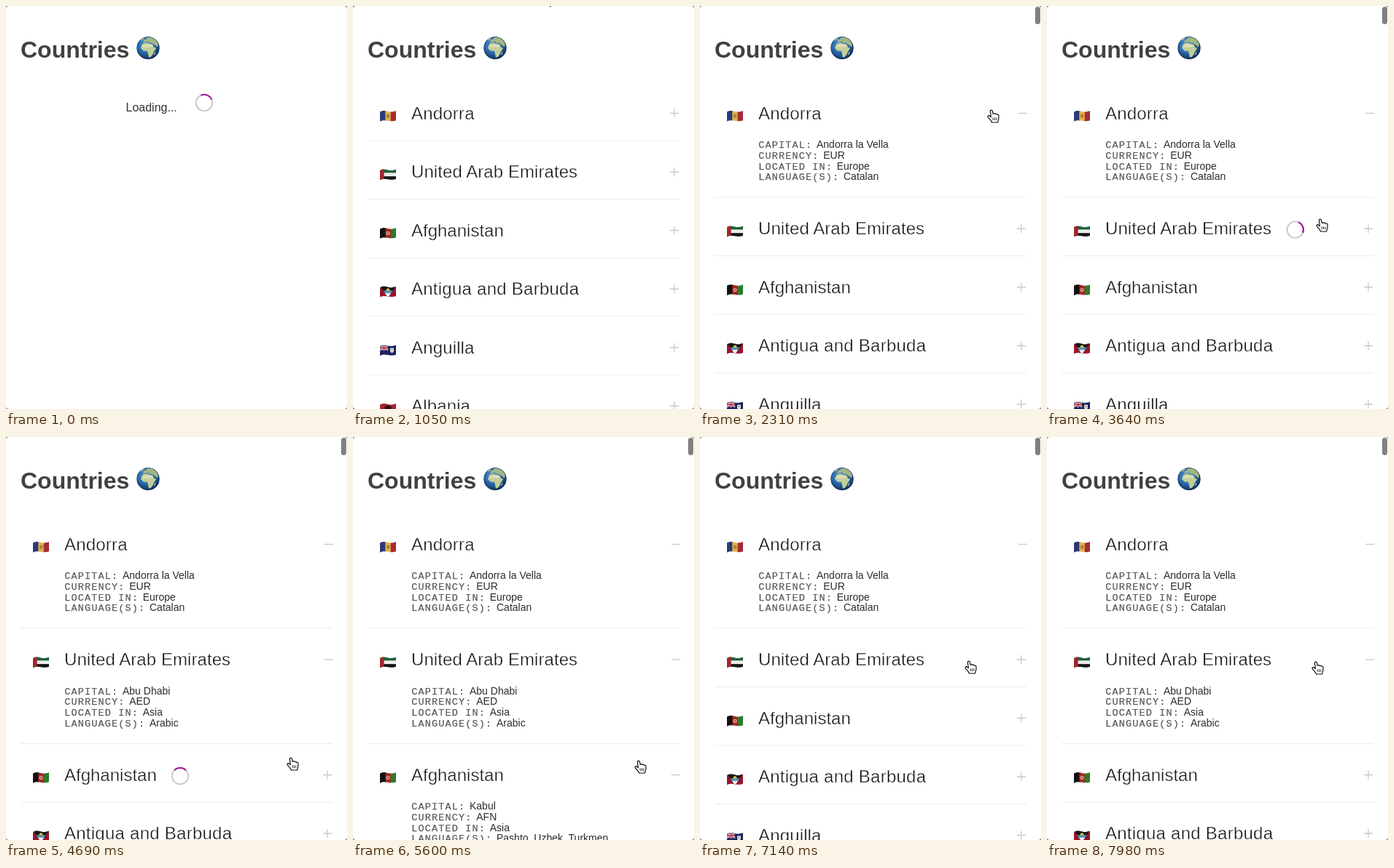
An HTML page that plays this animation: 468x554 px, repeating every 8000 ms.

```html
<!DOCTYPE html>
<html lang="en">
<head>
<meta charset="utf-8">
<title>Countries</title>
<style>
  html, body { margin: 0; width: 100%; height: 100%; overflow: hidden; background: #fff; }
  svg { display: block; width: 468px; height: 554px; }
  text { font-family: "Liberation Sans", Arial, Helvetica, sans-serif; fill: #333; white-space: pre; }
  .title { font-size: 32px; font-weight: 700; fill: #414141; }
  .loading { font-size: 16px; }
  /* the white outline thins the letters to a light weight */
  .name { font-size: 24px; fill: #141414; stroke: #fff; stroke-width: .45px; }
  .key { font: 13.5px "Liberation Mono", "Courier New", monospace; letter-spacing: 1.15px; fill: #5c5c5c; stroke: #5c5c5c; stroke-width: .25px; }
  .value { font-size: 14px; fill: #2b2b2b; }
  .rule { stroke: #ececec; }
  .sign { stroke: #c8c8c8; stroke-width: 1.3; }
</style>
</head>
<body>
<svg viewBox="0 0 468 554" xmlns="http://www.w3.org/2000/svg">
  <defs>
    <radialGradient id="sea" cx=".42" cy=".36" r=".66">
      <stop offset="0" stop-color="#5c9fd6"/>
      <stop offset=".55" stop-color="#2a68a8"/>
      <stop offset="1" stop-color="#0f2c54"/>
    </radialGradient>
    <clipPath id="disc"><circle r="15.8"/></clipPath>
    <clipPath id="wave">
      <path d="M0 2.2C4 .2 7 .4 11 1.6S18 2.4 22 .8V14C18 15.6 15 15 11 14.4S4 13.4 0 15.4Z"/>
    </clipPath>
  </defs>
  <path fill="#777" d="M0 0H468V554H0Z"/>
  <rect width="468" height="554" rx="4" fill="#fff"/>

  <text class="title" x="20" y="71">Countries</text>
  <g transform="translate(195 57.7)" clip-path="url(#disc)">
    <circle r="15.8" fill="url(#sea)"/>
    <g fill="#c3cf9a">
      <path d="M-8-5C-5-8-1-7 1-6L6-5 8-1 11 0C10 3 7 5 7 8L4 12 1 13 0 8-1 4-6 4-10 0Z"/>
      <path d="M-7-8-6-11-3-12-1-15 5-15 11-11 14-6 13-1 11-3 8-5 5-7 2-7 0-9-4-8Z" fill="#a3b580"/>
      <path d="M9 6 10 5 10 8 8 10Z"/>
      <path d="M-11-10-8-14-5-14-8-11Z" fill="#d6e2c4"/>
    </g>
    <path d="M-8-3C-4-6 3-5 6-4L7-2C2-1-4-1-8-1Z" fill="#e0ddb4"/>
    <circle r="15.3" fill="none" stroke="#0d2c58" stroke-opacity=".5"/>
  </g>

  <text class="loading" id="loading" x="164.5" y="145">Loading...</text>
  <g id="list"></g>
  <g id="spinner" fill="none" stroke-width="2">
    <circle r="11.2" stroke="#ccc"/>
    <path d="M-7.92-7.92A11.2 11.2 0 0 1 7.92-7.92" stroke="#a3129c"/>
  </g>
  <rect id="thumb" x="460" y="1" width="7" height="24" rx="3.5" fill="#808080"/>

  <g id="cursor" stroke-linejoin="round">
    <g id="hand" transform="translate(-1 0)" stroke="#111" stroke-width="1.2">
      <path fill="#fff" d="M-1.6 1.6C-1.6-.3.9-.3 1.3 1.2L2.3 5.3C3 4.2 4.9 4.3 5.2 5.6 6 4.8 7.5 5.1 7.8 6.4 8.6 5.8 10 6.3 10 7.7V11C10 13.2 8.8 14 8.6 17H.6C0 14.6-3 12.2-4.8 9.6-5.6 8-3.5 7-2.2 8.2L-.6 9.6Z"/>
      <path fill="none" stroke-width=".9" d="M2.2 10.3V14M4.5 10.3V14M6.8 10.3V14"/>
    </g>
    <path id="arrow" fill="#111" stroke="#fff" d="M0 0V14.2L3.3 11.2 5.5 16.3 7.9 15.3 5.7 10.3H10Z"/>
  </g>
</svg>
<script>
const NS = "http://www.w3.org/2000/svg";
const LOOP = 8000, LOADED = 800, SCROLLBAR = 1960;
const FIRST_Y = 147.5, ROW = 80.5, DETAIL = 78;
const $ = id => document.getElementById(id);

function add(parent, tag, attrs, content) {
  const node = document.createElementNS(NS, tag);
  for (const k in attrs) node.setAttribute(k, attrs[k]);
  if (content) node.textContent = content;
  return parent.appendChild(node);
}

const band = (x, y, w, h, fill) => ["rect", { x, y, width: w, height: h, fill }];
const shape = (d, fill) => ["path", { d, fill }];
const line = (d, stroke, w) => ["path", { d, stroke, "stroke-width": w }];
const dot = (cx, cy, r, fill) => ["circle", { cx, cy, r, fill }];

// open: time spans during which the details are shown
const countries = [
  { name: "Andorra", gap: .2, open: [[1960, LOOP]],
    info: ["Andorra la Vella", "EUR", "Europe", "Catalan"],
    flag: [band(0, 0, 8, 16, "#2c3a78"), band(7.3, 0, 7.7, 16, "#dfb647"), band(14.7, 0, 8, 16, "#a82a36"),
      band(9, 5.5, 4.2, 5, "#b08045")] },
  { name: "United Arab Emirates", gap: .07, open: [[4130, 6930], [7490, LOOP]],
    info: ["Abu Dhabi", "AED", "Asia", "Arabic"],
    flag: [band(0, 0, 22, 6, "#1f6138"), band(0, 5.6, 22, 5, "#ededed"), band(0, 10.3, 22, 6, "#161616"),
      band(0, 0, 5.6, 16, "#a1262c")] },
  { name: "Afghanistan", gap: 0, open: [[5040, 5950]],
    info: ["Kabul", "AFN", "Asia", "Pashto, Uzbek, Turkmen"],
    flag: [band(0, 0, 8, 16, "#111"), band(7.3, 0, 7.7, 16, "#a82420"), band(14.7, 0, 8, 16, "#2f7a2c"),
      dot(11, 8, 2.6, "#d9a698"), dot(11, 8, 1.3, "#b0443c")] },
  { name: "Antigua and Barbuda", gap: .25, open: [],
    flag: [band(0, 0, 22, 16, "#98162b"), shape("M0 0H22L11 16Z", "#161616"), shape("M4.5 6.5H17.5L11 16Z", "#4a96bf"),
      shape("M6.8 10H15.2L11 16Z", "#f4f4f4"), shape("M8 6.6 9 4.4 11 3.2 13 4.4 14 6.6Z", "#dcc04a")] },
  { name: "Anguilla", gap: .15, open: [],
    flag: [band(0, 0, 22, 16, "#1c2560"), line("M0 1 11 8M11 1 0 8", "#eee", 1.8), line("M0 1 11 8M11 1 0 8", "#b0203a", .7),
      line("M5.5 0V8.5M0 4.8H11", "#eee", 2.8), line("M5.5 0V8.5M0 4.8H11", "#b0203a", 1.5),
      shape("M14 5H19V9.5L16.5 12 14 9.5Z", "#dfe3e0"), band(15, 6.5, 3, 1.6, "#d09a50")] },
  { name: "Albania", gap: .15, open: [],
    flag: [band(0, 0, 22, 16, "#ac2030"),
      shape("M11 4 9 2.8 9.4 5 6.4 4.6 7 9 9.6 9.6 11 13.2 12.4 9.6 15 9 15.6 4.6 12.6 5 13 2.8Z", "#1b1113")] }
];
const keys = ["CAPITAL:", "CURRENCY:", "LOCATED IN:", "LANGUAGE(S):"];

// each spin turns once a second and passes angle "deg" at time "at"
const spins = [
  { from: 0, to: LOADED, x: 272, y: 133, at: 0, deg: 21 },
  { from: 1400, to: 1960, x: 200, y: 149, at: 1400, deg: 0 },
  { from: 3430, to: 4130, x: 340.7, y: 307.5, at: 3640, deg: 67 },
  { from: 4480, to: 5040, x: 239, y: 466, at: 4690, deg: 0 }
];

// pointer tip: time, x, y
const path = [
  [0, 262, -40], [910, 262, -30], [1050, 264.5, -14.5], [1380, 400, 141], [1820, 402, 144], [2310, 401, 143],
  [2660, 401, 143], [3360, 376, 293], [4130, 376, 293], [4450, 392, 441], [5250, 392, 441],
  [5600, 393, 445], [6000, 392, 443], [6440, 391, 423], [6800, 372, 311], [7140, 370, 308], [7350, 370, 308], [7980, 370, 309]
];

function buildRow(c) {
  c.node = add($("list"), "g");
  const flag = add(add(c.node, "g", { transform: "translate(37 -4.2)" }), "g", { "clip-path": "url(#wave)" });
  c.flag.forEach(([tag, attrs]) => add(flag, tag, attrs));
  add(c.node, "text", { class: "name", x: 80, y: 8.3, "letter-spacing": c.gap }, c.name);
  c.plus = add(c.node, "path", { class: "sign", d: "M435 0H447M441-6V6" });
  c.minus = add(c.node, "path", { class: "sign", d: "M437 0H449" });
  c.rule = add(c.node, "path", { class: "rule", d: "M20 0H448" });
  c.details = add(c.node, "g");
  (c.info || []).forEach((value, i) => {
    const y = 47.8 + 14.6 * i;
    add(c.details, "text", { class: "key", x: 80.3, y }, keys[i]);
    add(c.details, "text", { class: "value", x: 86 + 9.25 * keys[i].length, y }, value);
  });
}
countries.forEach(buildRow);

const show = (node, on) => node.setAttribute("display", on ? "inline" : "none");
const move = (node, x, y, deg = 0) => node.setAttribute("transform", `translate(${x} ${y}) rotate(${deg})`);
const ease = u => u * u * (3 - 2 * u);

function pointAt(t) {
  const i = path.findIndex(p => p[0] > t);
  if (i < 0) return path[path.length - 1].slice(1);
  const [t0, x0, y0] = path[i - 1], [t1, x1, y1] = path[i];
  const u = ease((t - t0) / (t1 - t0));
  return [x0 + (x1 - x0) * u, y0 + (y1 - y0) * u];
}

function render(t) {
  const loaded = t >= LOADED;
  show($("loading"), !loaded);
  show($("list"), loaded);
  show($("thumb"), t >= SCROLLBAR);

  const [px, py] = pointAt(t);
  let y = FIRST_Y, hover = false;
  for (const c of countries) {
    const open = c.open.some(([a, b]) => t >= a && t < b);
    const extra = open ? DETAIL : 0;
    move(c.node, 0, y);
    move(c.rule, 0, 37.5 + extra);
    show(c.plus, !open);
    show(c.minus, open);
    show(c.details, open);
    if (Math.abs(py - y) < 26) hover = true;
    y += ROW + extra;
  }

  const spin = spins.find(s => t >= s.from && t < s.to);
  show($("spinner"), spin);
  if (spin) move($("spinner"), spin.x, spin.y, spin.deg + (t - spin.at) * .36);

  move($("cursor"), px, py);
  show($("hand"), hover);
  show($("arrow"), !hover);
}

function tick() {
  render(performance.now() % LOOP);
  requestAnimationFrame(tick);
}
tick();
</script>
</body>
</html>
```
